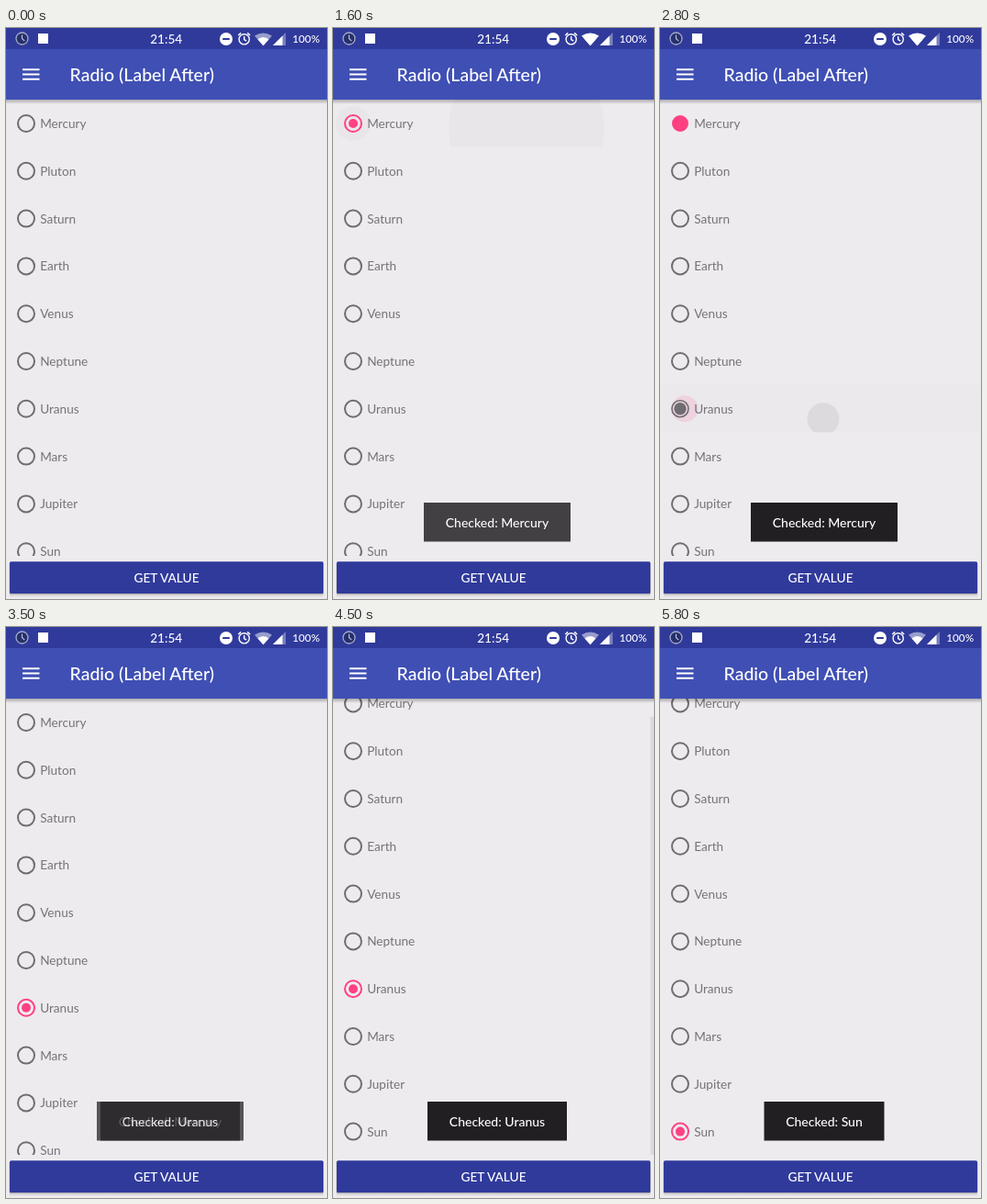
An HTML page that plays this animation: 350x622 px, repeating every 5.9 s.

```html
<!DOCTYPE html>
<html lang="en">
<head>
<meta charset="utf-8">
<title>Radio list</title>
<style>
  html, body { margin: 0; width: 100%; height: 100%; overflow: hidden; background: #eeebef; }
  svg { display: block; width: 100vw; height: 100vh; }
  text { font-family: Lato, "Open Sans", sans-serif; }
  .white { fill: #fff; font-weight: 500; }
  .label { fill: #757378; font-size: 13.6px; }
  .mid { text-anchor: middle; }
</style>
</head>
<body>
<svg viewBox="0 0 350 622">
  <defs>
    <clipPath id="listClip"><rect y="78" width="350" height="497"/></clipPath>
    <clipPath id="rowClip"><rect width="350" height="51.8"/></clipPath>
    <clipPath id="wifiClip"><circle cx="280.5" cy="19" r="9"/></clipPath>
    <linearGradient id="shade" x2="0" y2="1">
      <stop offset="0" stop-color="#000" stop-opacity=".28"/>
      <stop offset="1" stop-color="#000" stop-opacity="0"/>
    </linearGradient>
  </defs>
  <rect width="350" height="622" fill="#eeebef"/>
  <g clip-path="url(#listClip)">
    <g id="list"></g>
    <circle id="glow" cx="255" r="1000" fill="#303f9f"/>
    <rect id="bar" x="346" width="4" height="477" fill="#a5a3a6"/>
  </g>

  <rect y="78" width="350" height="5" fill="url(#shade)"/>
  <rect y="23" width="350" height="55" fill="#3f4fb4"/>
  <rect width="350" height="23" fill="#303a9b"/>
  <path d="M18 45.2h18.5M18 50.5h18.5M18 55.8h18.5" stroke="#fff" stroke-width="2"/>
  <text class="white" x="69.5" y="58" font-size="19.5">Radio (Label After)</text>

  <g id="status">
    <circle cx="17.5" cy="11.5" r="6.5" fill="#26306c" stroke="#a5acc8" stroke-width="1.3"/>
    <path d="M17.5 7.5v4l2.7 2.7" fill="none" stroke="#c3c9dc" stroke-width="1.1"/>
    <rect x="35" y="6" width="11" height="11" fill="#fff"/>
    <text class="white mid" x="174.7" y="16.9" font-size="13.6">21:54</text>
    <circle cx="240" cy="12" r="7" fill="#fff"/>
    <path d="M236.2 12h7.6" stroke="#303a9b" stroke-width="2"/>
    <g fill="none" stroke="#fff" stroke-width="1.4">
      <circle cx="259.7" cy="12.3" r="5.6"/>
      <path d="M259.7 9v3.6l2.5 1.6M253.2 8l3-2.6M266.2 8l-3-2.6"/>
    </g>
    <path id="wifi" d="M271 8.6Q280.5 2.6 290 8.6L280.5 19.3Z" fill="#fff"/>
    <path d="M271 8.6Q280.5 2.6 290 8.6L280.5 19.3Z" fill="#fff" clip-path="url(#wifiClip)"/>
    <path d="M291 19L305 5V19Z" fill="#fff" opacity=".35"/>
    <path d="M291 19L301.5 8.5V19Z" fill="#fff"/>
    <text class="white" x="312.3" y="16.3" font-size="11.7">100%</text>
  </g>

  <rect x="4" y="614" width="342" height="6" fill="url(#shade)"/>
  <rect x="3" y="582" width="344" height="35" rx="2" opacity=".12"/>
  <rect x="4" y="581.3" width="342" height="34.7" rx="1.5" fill="#303a9b"/>
  <text class="white mid" x="175" y="604" font-size="13.7">GET VALUE</text>
  <g id="toasts"></g>
</svg>
<script>
const LOOP = 5900, STEP = 100, ROW = 51.8;
const GREY = [111, 109, 113], PINK = [255, 64, 129], DARK = [90, 80, 88];
const names = ["Mercury", "Pluton", "Saturn", "Earth", "Venus", "Neptune", "Uranus", "Mars", "Jupiter", "Sun"];
const taps = [
  { row: 0, at: 1300, x: 211, y: 31, width: 160, toast: 1350 },
  { row: 6, at: 2800, x: 178, y: 37, width: 152, toast: 3380 },
  { row: 9, at: 4800, x: 89.5, y: 22, width: 131, toast: 5380 }
];

const $ = id => document.getElementById(id);
const clamp = v => Math.max(0, Math.min(1, v));
const ramp = (t, from, to) => clamp((t - from) / (to - from));
const lerp = (a, b, k) => a + (b - a) * k;
const ease = k => k * k * (3 - 2 * k);
const mix = (a, b, k) => `rgb(${a.map((v, i) => Math.round(lerp(v, b[i], k)))})`;

function set(el, attrs) {
  for (const key in attrs) el.setAttribute(key, attrs[key]);
  return el;
}
function add(parent, tag, attrs, text) {
  const el = set(document.createElementNS("http://www.w3.org/2000/svg", tag), attrs);
  if (text) el.textContent = text;
  return parent.appendChild(el);
}

const rows = names.map((name, i) => {
  const g = add($("list"), "g", { transform: `translate(0 ${78 + i * ROW})` });
  const clip = add(g, "g", { "clip-path": "url(#rowClip)" });
  const row = {
    press: add(clip, "rect", { width: 350, height: ROW }),
    ripple: add(clip, "circle", {}),
    halo: add(g, "circle", { cy: 26 }),
    ring: add(g, "circle", { cx: 22, cy: 26, fill: "none" }),
    dot: add(g, "circle", { cx: 22, cy: 26 })
  };
  add(g, "text", { class: "label", x: 37.2, y: 31 }, name);
  return row;
});

const toasts = taps.map(tap => {
  const g = add($("toasts"), "g", {});
  add(g, "rect", { x: 179 - tap.width / 2, y: 517, width: tap.width, height: 42.5, fill: "#221f23" });
  add(g, "text", { class: "white mid", x: 179, y: 544, "font-size": 14 }, "Checked: " + names[tap.row]);
  return g;
});

function drawRadio(row, on, off) {
  let color = mix(GREY, PINK, 0), radius = 9, stroke = 2, dot = 0;
  if (off >= 0) {
    const k = ramp(off, 0, 200);
    color = mix(PINK, GREY, k);
    stroke = lerp(9, 2, k);
    radius = 10 - stroke / 2 - (1 - k);
  } else if (on >= 0) {
    const k = ramp(on, 0, 200);
    color = mix(GREY, PINK, k);
    stroke = lerp(1.6, 2, k);
    dot = lerp(6.7, 5, k);
  }
  set(row.ring, { r: radius, stroke: color, "stroke-width": stroke });
  set(row.dot, { r: dot, fill: color });
}

function drawTouch(row, tap, age) {
  const live = age >= 0 && age < 500;
  const k = ramp(age, 0, 300), fade = 1 - ramp(age, 300, 500);
  set(row.press, { opacity: live ? 0.009 * fade * (1 - k) : 0 });
  set(row.ripple, {
    cx: tap.x, cy: tap.y,
    r: lerp(17.5, 85, k),
    opacity: live ? lerp(0.065, 0.02, k) * fade : 0
  });
  set(row.halo, {
    cx: lerp(27, 22, k),
    r: lerp(14.5, 19, k),
    fill: mix(PINK, DARK, k),
    opacity: live ? lerp(0.13, 0.035, k) * fade : 0
  });
}

function draw(t) {
  rows.forEach((row, i) => {
    const n = taps.findIndex(tap => tap.row === i);
    const next = taps[n + 1];
    drawRadio(row, n < 0 ? -1 : t - taps[n].at, n >= 0 && next ? t - next.at : -1);
    drawTouch(row, taps[Math.max(n, 0)], n < 0 ? -1 : t - taps[n].at);
  });

  toasts.forEach((toast, i) => {
    const next = taps[i + 1];
    const shown = ramp(t, taps[i].toast, taps[i].toast + (i ? 160 : 300));
    const gone = next ? ramp(t, next.toast + 20, next.toast + 400) : 0;
    set(toast, { opacity: shown * (1 - gone) });
  });

  const scroll = 20.6 * ease(ramp(t, 3500, 3900));
  set($("list"), { transform: `translate(0 ${-scroll})` });
  set($("bar"), {
    y: 78 + scroll * 0.96,
    opacity: ramp(t, 3500, 3600) * (1 - ramp(t, 4200, 4600))
  });
  const pull = ramp(t, 3800, 4000) * (1 - ramp(t, 4000, 4500));
  set($("glow"), { cy: 1534 + 41 * (1 - pull), opacity: 0.21 * Math.sqrt(pull) });
  set($("wifi"), { opacity: t >= 1600 && t < 3400 ? 1 : 0.5 });
}

const start = performance.now();
function tick() {
  const t = (performance.now() - start) % LOOP;
  draw(Math.floor(t / STEP) * STEP);
  requestAnimationFrame(tick);
}
tick();
</script>
</body>
</html>
```
